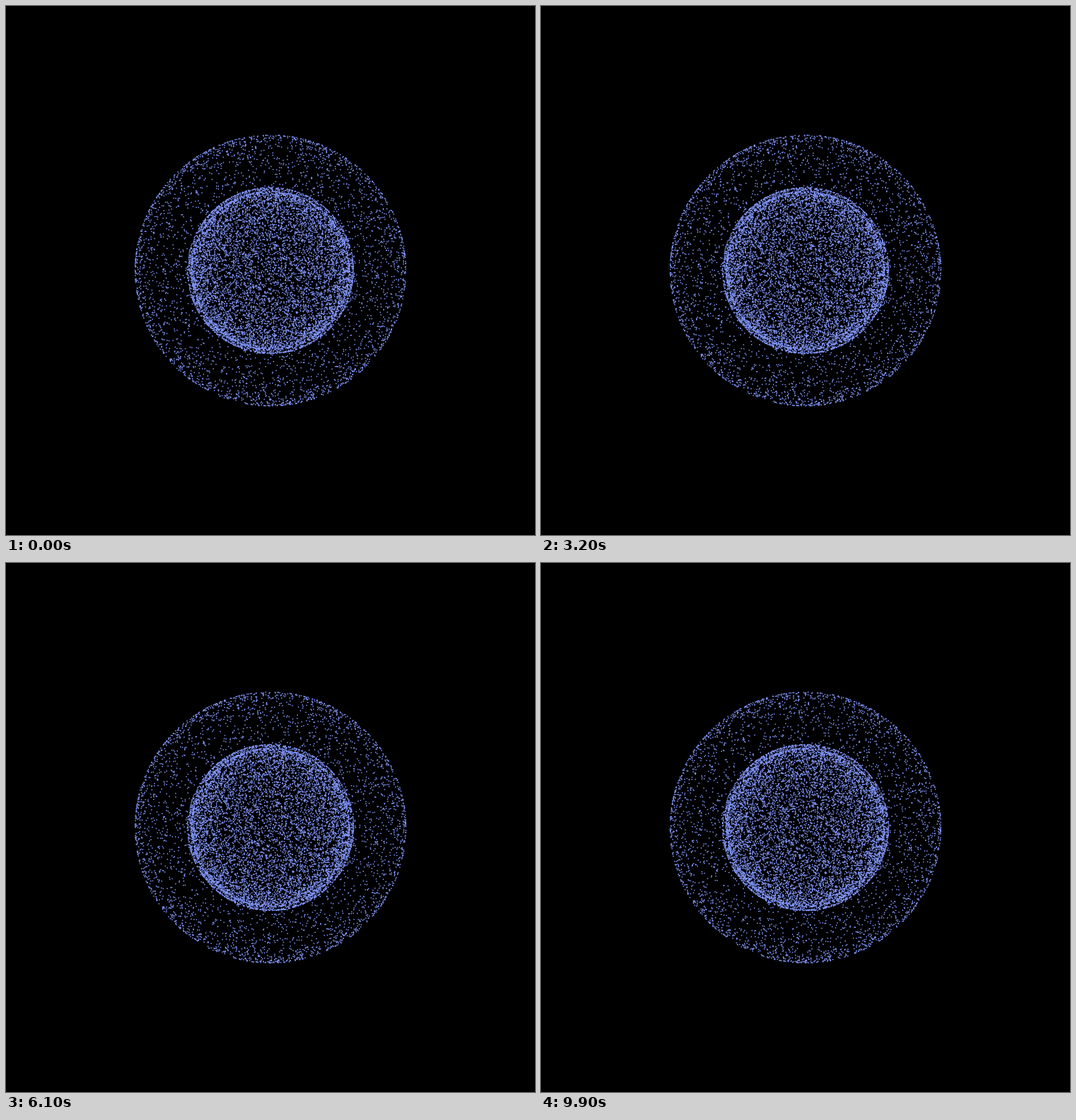
Write an HTML page with a canvas that moves like this. It is 748 px wide and 748 px high and loops after 10 s.

```html
<!DOCTYPE html>
<html lang="en">
<head>
<meta charset="utf-8">
<title>Particle spheres</title>
<style>
  html, body { margin: 0; height: 100%; overflow: hidden; background: #000; }
  canvas { display: block; }
</style>
</head>
<body>
<canvas width="748" height="748"></canvas>
<script>
const ctx = document.querySelector('canvas').getContext('2d');
const CENTER = 374, DOT = 1.5, LOOP = 10000, STEP = 100;
const SPIN = 0.0145; // radians per second, clockwise

let seed = 20117;
function random() {
  seed = (seed + 0x6D2B79F5) | 0;
  let t = Math.imul(seed ^ (seed >>> 15), 1 | seed);
  t = (t + Math.imul(t ^ (t >>> 7), 61 | t)) ^ t;
  return ((t ^ (t >>> 14)) >>> 0) / 4294967296;
}

// Random points on a sphere's surface, seen straight on
function sphere(radius, count) {
  return Array.from({ length: count }, () => {
    const depth = 2 * random() - 1;
    const angle = 2 * Math.PI * random();
    const r = radius * Math.sqrt(1 - depth * depth);
    return [r * Math.cos(angle), r * Math.sin(angle)];
  });
}

// One wide shell around two close inner shells
const points = [[191.5, 4000], [117.5, 4000], [112, 4000]].flatMap(shell => sphere(...shell));

const start = performance.now();
let shown = -1;

function draw() {
  const step = Math.floor((performance.now() - start) % LOOP / STEP);
  if (step !== shown) {
    shown = step;
    const turn = SPIN * step * STEP / 1000;
    const c = Math.cos(turn), s = Math.sin(turn);
    const corner = CENTER - DOT / 2;
    ctx.fillStyle = '#000';
    ctx.fillRect(0, 0, 748, 748);
    ctx.fillStyle = '#8599ff';
    for (const [x, y] of points) ctx.fillRect(corner + x * c - y * s, corner + x * s + y * c, DOT, DOT);
  }
  requestAnimationFrame(draw);
}
draw();
</script>
</body>
</html>
```
